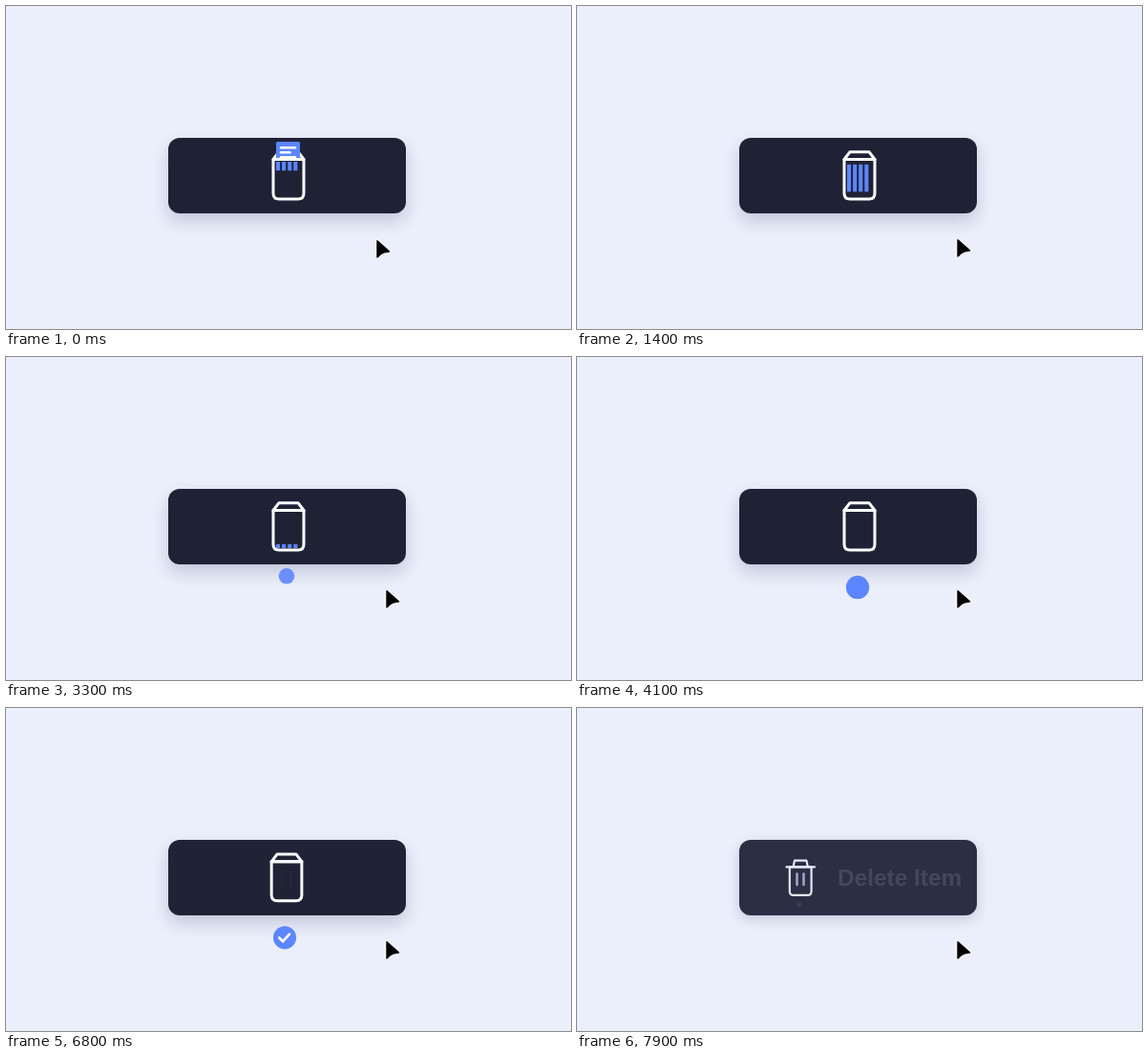
Animation, 592 px wide and 338 px high, one loop 8000 ms. Source, as an HTML page:

```html
<!DOCTYPE html>
<html lang="en">
<head>
<meta charset="utf-8">
<title>Delete button</title>
<style>
  html, body { margin: 0; width: 100%; height: 100%; overflow: hidden; background: #ebeffb; }
  svg { display: block; width: 100vw; height: 100vh; }
  text { font: bold 24.4px "Liberation Sans", Arial, sans-serif; }
</style>
</head>
<body>
<svg viewBox="0 0 592 338">
  <defs>
    <filter id="blur" x="-30%" y="-60%" width="160%" height="220%">
      <feGaussianBlur id="blurSize" stdDeviation="9"/>
    </filter>
    <clipPath id="aboveSlot"><rect x="-40" y="-80" width="80" height="59.5"/></clipPath>
    <clipPath id="inside"><rect x="-15" y="-18" width="30" height="37"/></clipPath>
  </defs>

  <rect id="shadow" x="170" y="138" width="249" height="79" rx="12" fill="#00093d" filter="url(#blur)"/>
  <rect id="button" x="170" y="138" width="249" height="79" rx="12"/>
  <text id="label" x="273" y="186" fill="#fff">Delete Item</text>

  <g id="can">
    <g id="check">
      <circle r="12.5" fill="#5c86ff"/>
      <path id="tick" d="M-6 .2L-2 4L5.2-3.8" pathLength="1" fill="none" stroke="#fff" stroke-width="2.8"
            stroke-linecap="round" stroke-linejoin="round"/>
    </g>
    <g id="bars" stroke="#bbc1e1" stroke-width="3.6" stroke-linecap="round">
      <path d="M-5.2-10.5V5.5M4.6-10.5V5.5"/>
    </g>
    <g clip-path="url(#inside)"><g id="strips" fill="#5c86ff"></g></g>
    <path id="handle" fill="none" stroke-width="3" stroke-linejoin="round"/>
    <g clip-path="url(#aboveSlot)">
      <g id="paper">
        <rect x="-13" width="25" height="31" rx="1.5" fill="#5c86ff"/>
        <path d="M-8 6.3H7M-8 11.3H1.5M-8 16.3H7" stroke="#fff" stroke-width="2.6" stroke-linecap="round"/>
      </g>
    </g>
    <path id="body" fill="none" stroke-width="3" stroke-linejoin="round"
          d="M-16-20.5H16V15Q16 21 10 21H-10Q-16 21-16 15Z"/>
    <path id="lid" stroke-width="3" stroke-linecap="round"/>
  </g>

  <path id="cursor" d="M0 1.2Q0-.7 1.5.6L13.6 11.2Q14.8 12.5 13 12.7Q7.6 13 4.6 15.3L1.6 18.2Q0 19.4 0 17.4Z"
        fill="#000" stroke="#fff" stroke-width="1.6" stroke-linejoin="round" paint-order="stroke"/>
</svg>

<script>
const LOOP = 8000, STEP = 100;
const RESET = 6700;          // when the button returns to its idle state
const FEED = 0.0158;         // paper speed, px per ms

const $ = id => document.getElementById(id);
const set = (id, attrs) => {
  for (const key in attrs) $(id).setAttribute(key, attrs[key]);
};
const mix = (a, b, k) => a + (b - a) * k;
const mixColor = (a, b, k) => `rgb(${a.map((v, i) => Math.round(mix(v, b[i], k)))})`;

// The CSS "ease" curve: cubic-bezier(.25, .1, .25, 1)
function ease(x) {
  if (x <= 0) return 0;
  if (x >= 1) return 1;
  const bezier = (p, q, u) => 3 * p * u * (1 - u) ** 2 + 3 * q * u * u * (1 - u) + u ** 3;
  let lo = 0, hi = 1;
  for (let i = 0; i < 24; i++) {
    const mid = (lo + hi) / 2;
    if (bezier(0.25, 0.25, mid) < x) lo = mid; else hi = mid;
  }
  return bezier(0.1, 1, lo);
}
const tween = (t, start, length) => ease((t - start) / length);

$('strips').innerHTML = [0, 1, 2, 3]
  .map(i => `<rect x="${-13 + i * 6.1}" width="4.1" height="28.5"/>`).join('');

function drawButton(t) {
  const k = tween(t, RESET, 1100);
  set('button', { fill: mixColor([31, 34, 53], [43, 47, 68], k) });
  set('shadow', { opacity: mix(0.18, 0.17, k), transform: `translate(0 ${mix(8, 4, k)})` });
  set('blurSize', { stdDeviation: mix(9, 7, k) });
  set('label', { opacity: tween(t, 7700, 1800) });
}

function drawCan(t) {
  const k = tween(t, RESET, 2400);
  const color = mixColor([255, 255, 255], [225, 230, 249], k);
  const top = mix(10, 8.5, k), base = mix(16, 9.5, k), half = mix(16, 22, k);
  const rise = mix(-28.3, -30.5, k);

  set('can', { transform: `translate(${mix(296, 219, k)} 181) scale(${mix(1, 0.64, k)})` });
  set('handle', { d: `M${-base}-20.5L${-top} ${rise}H${top}L${base}-20.5`, stroke: color });
  set('lid', { d: `M${-half}-20.5H${half}`, stroke: color });
  set('body', { stroke: color });
  set('bars', { opacity: k });
  set('paper', { transform: `translate(0 ${-39 + t * FEED})` });
  set('strips', { transform: `translate(0 ${-37.3 + t * FEED})` });
}

function drawCheck(t) {
  const shown = tween(t, 2720, 1800) - tween(t, RESET, 1800);
  set('check', {
    transform: `translate(-2 ${mix(32.5, 61, shown)}) scale(${mix(0.24, 1, shown)})`,
    opacity: Math.min(1, shown * 1.6)
  });
  const drawn = tween(t, 4520, 1800);
  set('tick', { 'stroke-dasharray': `${drawn} 2`, opacity: drawn > 0 ? 1 : 0 });
}

function drawCursor(t) {
  const k = tween(t, 0, 400);
  set('cursor', { transform: `translate(${mix(388.3, 398.3, k)} ${mix(245, 244, k)})` });
}

function render(now) {
  const t = Math.floor((now % LOOP) / STEP) * STEP;
  drawButton(t);
  drawCan(t);
  drawCheck(t);
  drawCursor(t);
}

const began = performance.now();
function tick() {
  render(performance.now() - began);
  requestAnimationFrame(tick);
}
tick();
</script>
</body>
</html>
```
